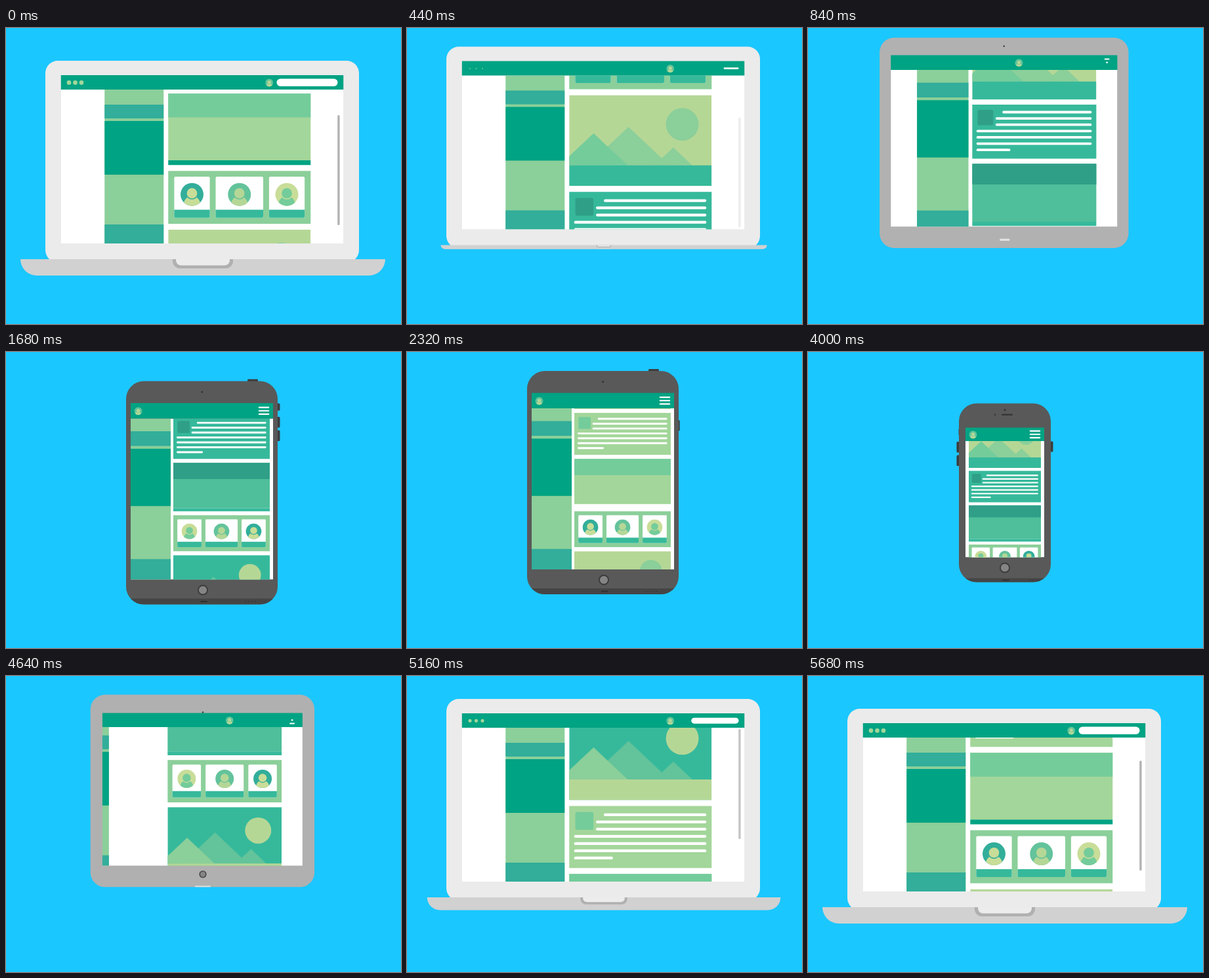
An HTML page with a canvas that plays this animation: 602x452 px, repeating every 5.72 s.

```html
<!DOCTYPE html>
<html lang="en">
<head>
<meta charset="utf-8">
<title>Responsive devices</title>
<style>
html, body { margin: 0; width: 100%; height: 100%; overflow: hidden; background: #1bc7ff; }
canvas { display: block; }
</style>
</head>
<body>
<canvas id="stage" width="602" height="452"></canvas>
<script>
const ctx = document.getElementById('stage').getContext('2d');
const LOOP = 5720;
const DARK = '#00a383', TEAL = '#32ae9a', MINT = '#36b99b', SEA = '#63c39b', LEAF = '#8bcf9a',
  GRASS = '#74cc9b', PALE = '#a3d69a', LIME = '#b5d796', SAND = '#c8dd98', DEEP = '#309f88', INK = '#3c3c3c';

// gutter: from the screen's left edge to the main column
const laptop = { cx: 299, width: 478, height: 308, screen: 430.5, inset: 22, nav: 22, gutter: 163.5 };
const tablet = { cx: 298.5, width: 231, height: 341, screen: 217, inset: 33.5, nav: 23.5, gutter: 65 };
const phone = { cx: 300, width: 140, height: 273, screen: 120, inset: 37, nav: 20.5, gutter: 5 };

// feed sizes in column widths
const GAP = .0415, PICTURE = .64, ARTICLE = .436, BANNER = .503, TEAM = .373;
const HALF = PICTURE + ARTICLE + BANNER + TEAM + 4 * GAP;
const FLICK = 4 * HALF / 3, REST = 1.961;

const clamp = v => Math.max(0, Math.min(1, v));
const lerp = (a, b, p) => a + (b - a) * p;
const ramp = (t, start, time) => (1 - Math.cos(Math.PI * clamp((t - start) / time))) / 2;
const mix = (a, b, p) => Object.fromEntries(Object.keys(a).map(k => [k, lerp(a[k], b[k], p)]));

// rise, hang, then drop a little too far and settle
function hop(t, rise, fall) {
  const dip = Math.sin(Math.PI * clamp((t - fall - 200) / 400)) ** 2;
  return 33 * (ramp(t, rise, 470) - ramp(t, fall, 400)) - 6.5 * dip;
}

const lift = t => hop(t, 160, 1030) + hop(t, 2095, 3030) + hop(t, 4110, 4950);

// one flick per device; the laptop's runs across the loop's seam
function scrollAt(t) {
  const flicks = ramp(t + LOOP, 4680, 2205) + ramp(t, 1507, 1181) + ramp(t, 2983, 2335) + ramp(t, 4680, 2205);
  return REST + FLICK * flicks;
}

function rect(x0, y0, x1, y1, color, r = 0) {
  if (x1 <= x0 || y1 <= y0) return;
  ctx.fillStyle = color;
  ctx.beginPath();
  ctx.roundRect(x0, y0, x1 - x0, y1 - y0, r);
  ctx.fill();
}

// centred pill
function pill(x, y, w, h, color) {
  rect(x - w / 2, y - h / 2, x + w / 2, y + h / 2, color, h / 2);
}

function disc(x, y, r, color) {
  ctx.fillStyle = color;
  ctx.beginPath();
  ctx.arc(x, y, Math.max(0, r), 0, 7);
  ctx.fill();
}

function clipped(x0, y0, x1, y1, r, draw) {
  ctx.save();
  ctx.beginPath();
  ctx.roundRect(x0, y0, x1 - x0, y1 - y0, r);
  ctx.clip();
  draw();
  ctx.restore();
}

function avatar(x, y, r, back, front) {
  disc(x, y, r, back);
  clipped(x - r, y - r, x + r, y + r, r, () => {
    disc(x, y + r * .86, r * .72, front);
    disc(x, y - r * .08, r * .52, back);
    disc(x, y - r * .1, r * .45, front);
  });
}

function peak(x, y, ground, color) {
  const half = (ground - y) * 1.06;
  ctx.fillStyle = color;
  ctx.beginPath();
  ctx.moveTo(x, y);
  ctx.lineTo(x + half, ground);
  ctx.lineTo(x - half, ground);
  ctx.fill();
}

function picture(light) {
  const far = light ? LEAF : SEA, ground = .495;
  clipped(0, 0, 1, PICTURE, 0, () => {
    rect(0, 0, 1, PICTURE, light ? LIME : MINT);
    disc(.794, .206, .115, light ? LEAF : LIME);
    peak(.731, .369, ground, far);
    peak(.416, .224, ground, far);
    peak(.171, .269, ground, light ? GRASS : LEAF);
    rect(0, ground, 1, PICTURE, light ? MINT : LIME);
  });
}

function article(light) {
  rect(0, 0, 1, ARTICLE, light ? PALE : MINT);
  rect(.043, .042, .17, .167, light ? GRASS : DEEP, .012);
  for (let i = 0; i < 7; i++) {
    const y = .061 + .0508 * i, x = i === 0 ? .243 : i < 3 ? .188 : .034;
    rect(x, y - .01, i === 6 ? .307 : .963, y + .01, '#fff', .01);
  }
}

function banner(light, wide) {
  rect(0, 0, 1, .47, light ? PALE : '#4ebf9a');
  rect(0, 0, 1, .168, light ? GRASS : DEEP);
  ctx.globalAlpha = light ? wide : 1;
  rect(0, .47, 1, BANNER, light ? DARK : MINT);
  ctx.globalAlpha = 1;
}

function team(light) {
  const looks = [[TEAL, SAND], [SEA, LIME], [SAND, GRASS]];
  if (!light) looks.reverse();
  rect(0, 0, 1, TEAM, LEAF);
  looks.forEach((look, i) => {
    const x = .5 + .333 * (i - 1), half = i === 1 ? .167 : .125;
    rect(x - half, .041, x + half, .33, '#fff', .01);
    rect(x - half, .274, x + half, .33, MINT, [0, 0, .01, .01]);
    avatar(x, .166, .0805, ...look);
  });
}

function feed(x, y, w, scroll, wide) {
  const first = Math.floor(scroll / HALF);
  for (let k = first; k < first + 3; k++) {
    const light = k % 2 === 0;
    ctx.save();
    ctx.translate(x, y + (k * HALF - scroll) * w);
    ctx.scale(w, w);
    picture(light);
    ctx.translate(0, PICTURE + GAP);
    article(!light);
    ctx.translate(0, ARTICLE + GAP);
    banner(!light, wide);
    ctx.translate(0, BANNER + GAP);
    team(!light);
    ctx.restore();
  }
}

function sideButtons(t, left, right, top) {
  const reach = (i, from, to) => 3.5 * (ramp(t, from + i * 60, 100) - ramp(t, to + i * 60, 80));
  const key = (x0, x1, y, h) => rect(x0, top + y, x1, top + y + h, INK, 1.5);
  for (let i = 0; i < 3; i++) {
    const y = 34 + 20.5 * i, h = i ? 16.5 : 11;
    const onTablet = reach(i, 1240, 2160), onPhone = reach(i, 3040, 3940);
    if (onTablet > 0) key(right - 4, right + onTablet, y, h);
    if (onPhone > 0) key(left - onPhone, left + 4, y + 4, h);
  }
  const lid = reach(3, 1240, 2160), lock = reach(1, 3040, 3940);
  if (lid > 0) key(right - 46, right - 30, -lid * .85, 8);
  if (lock > 0) key(right - 4, right + lock, 58, 16);
}

function base(y, e) {
  if (e <= 0) return;
  const slab = (half, h, r, color) => rect(300 - half, y, 300 + half, y + h * e, color, [0, 0, r * e, r * e]);
  slab(lerp(239, 278, e), 25, 25, '#d1d1d1');
  slab(46 * e, 14, 11, '#b0b0b0');
  slab(41 * e, 9.5, 8, '#ececec');
}

function render(t) {
  const small = ramp(t, 571, 620), tiny = ramp(t, 2380, 620), grow = ramp(t, 4293, 620);
  const wide = 1 - small + grow, compact = 1 - wide, slim = tiny - grow;
  const extra = 1 - ramp(t, 200, 360) + ramp(t, 4900, 380);
  const back = t > LOOP / 2;
  const scroll = scrollAt(t);

  const d = mix(mix(mix(laptop, tablet, small), phone, tiny), laptop, grow);
  const left = d.cx - d.width / 2, right = left + d.width;
  const top = lerp(215, 204, wide) - lift(t) - d.height / 2, bottom = top + d.height;
  const sx0 = d.cx - d.screen / 2, sx1 = sx0 + d.screen;
  const sy = top + d.inset, view = sy + d.nav, mid = sy + d.nav / 2, end = bottom - lerp(38, 29, wide);
  const radius = lerp(27, 19, wide), grey = lerp(89, 235, wide);

  rect(0, 0, 602, 452, '#1bc7ff');
  sideButtons(t, left, right, top);
  rect(left, top, right, bottom, `rgb(${grey},${grey},${grey})`, radius);

  // darker lower edge with its socket
  const band = lerp(9, 6, tiny) * clamp(2 * compact - 1);
  if (band > 0) clipped(left, top, right, bottom, radius, () => {
    rect(left, bottom - band, right, bottom, '#454545');
    pill(301.5, bottom - band / 2, 11, 2, '#303030');
    for (let i = 0; i < 4; i++) disc(right - 49 + 16 * tiny + i * 5, bottom - band / 2, .8, '#303030');
  });

  // camera and speaker
  const camY = back ? lerp(10, 38.5, grow) : lerp(lerp(10.6, 16.5, small), 10, tiny);
  const speaker = clamp(2 * slim - 1);
  disc(lerp(298.7, 300, tiny), top + camY, 1.5 * clamp(2 * compact), '#333');
  pill(303.5, top + 17.2, 17 * speaker, 2.5, '#383838');
  disc(285, top + 17.2, 1.2 * speaker, '#333');

  // home button
  const home = 8 * clamp(back ? 1.7 * compact : 2 * compact - 1);
  const homeY = bottom - lerp(22, 18, wide);
  disc(300, homeY, home, INK);
  disc(300, homeY, home * .76, '#858585');
  if (!back && wide < 1 && wide > .3) pill(299.8, bottom - 12.6, 15.5, 3.2, '#e2e2e2');
  if (back && grow > .4 && extra < .3) pill(300, bottom - 1, 24, 2, '#dedede');

  // page
  const side0 = sx0 + 66.5 * wide - 267 * slim, side1 = side0 + lerp(61, 90, wide);
  const col0 = sx0 + d.gutter, col1 = sx1 - lerp(5, 50, wide);
  const settled = ramp(t, 571, 270) - tiny;
  const row = y => view + y * (1 + .067 * settled) - 5 * settled - 25 * slim;
  clipped(sx0, view, sx1, end, 0, () => {
    rect(sx0, view, sx1, end, '#fff');
    rect(side0, view, side1, end, LEAF);
    rect(side0, row(23), side1, row(44), TEAL);
    rect(side0, row(48), side1, row(130), DARK);
    rect(side0, row(206), side1, end, TEAL);
    feed(col0, view, col1 - col0, scroll, wide);

    const travel = (scroll - scrollAt(0) + 2 * HALF) % (4 * HALF) - 2 * HALF;
    const barY = view + Math.max(2, Math.min(64, 39 + travel * 49));
    ctx.globalAlpha = extra;
    rect(505.2, barY, 508.6, barY + 168, '#b3b3b3', 1.7);
    ctx.globalAlpha = 1;
  });

  // navigation bar
  rect(sx0, sy, sx1, view, DARK);
  for (let i = 0; i < 3; i++) disc(96 + 9.5 * i, mid + .4, 3.3 * extra, PALE);
  rect(505.5 - 93 * extra, mid - 5.5 * extra, 505.5, mid + 6 * extra, '#fff', 5.7 * extra);
  avatar(sx0 + lerp(11.5, 317.5, wide), mid + .5, 5.9, SEA, LIME);
  for (let i = 0; i < 3; i++) {
    const delay = .3 * (back ? 2 - i : i);
    pill(sx1 - lerp(14, 17, wide), mid + (i - 1) * 5.2, 16.6 * clamp(1.9 * compact - .28 - delay), 2.2, '#fff');
  }

  base(top + 303, extra);
}

function tick() {
  render(performance.now() % LOOP);
  requestAnimationFrame(tick);
}
tick();
</script>
</body>
</html>
```
